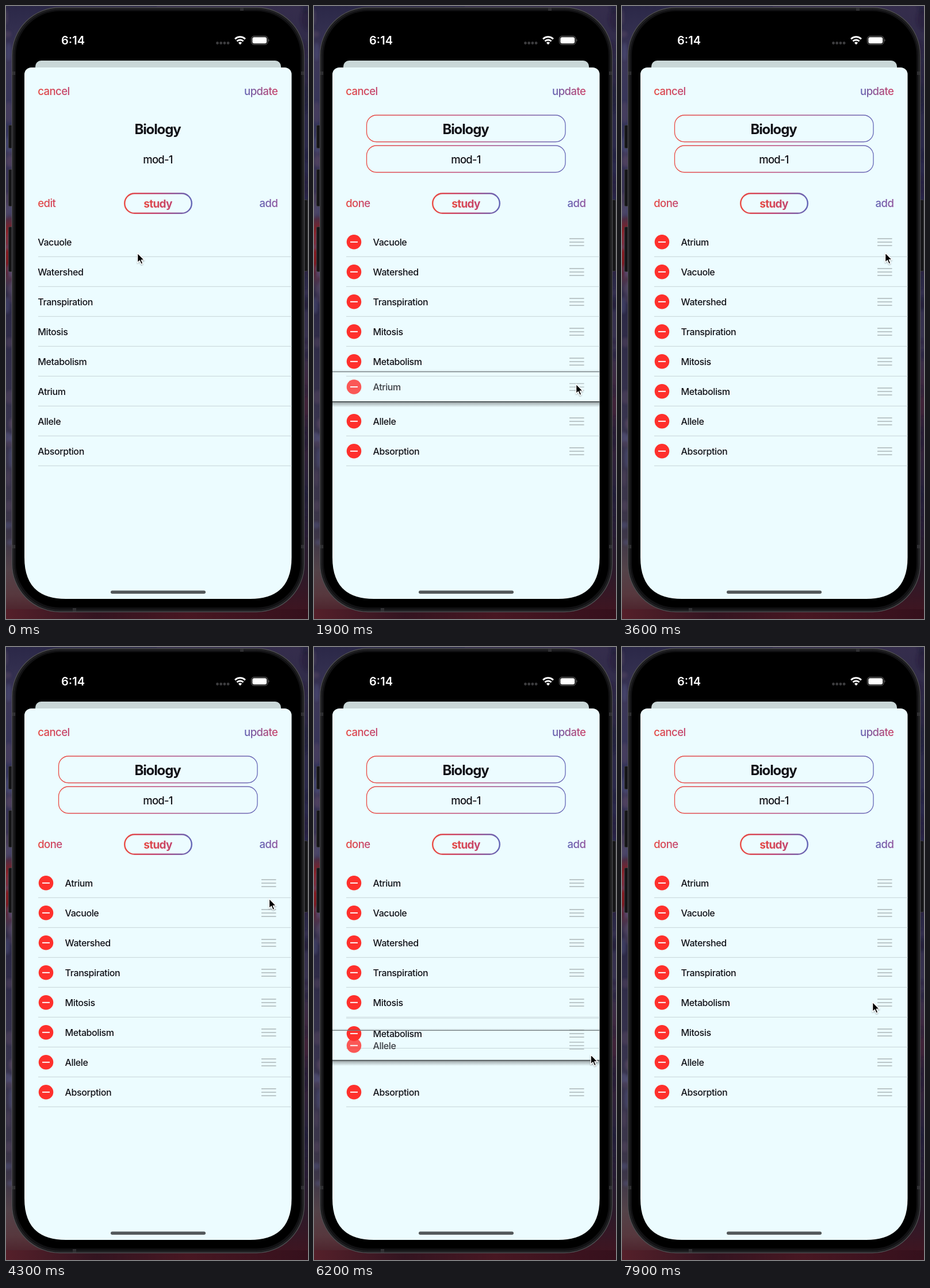
Write an HTML page that moves like this. It is 525 px wide and 1067 px high and loops after 8 s.

```html
<!DOCTYPE html>
<html lang="en">
<head>
<meta charset="utf-8">
<title>Study set editor</title>
<style>
html, body { margin: 0; width: 100%; height: 100%; overflow: hidden; background: #000; }
svg { display: block; width: 525px; height: 1067px; }
text { font-family: Inter, "Open Sans", sans-serif; font-weight: 500; fill: #111117; }
.link { font-size: 18.5px; letter-spacing: -.53px; }
.row text { font-size: 16px; font-weight: 550; letter-spacing: -.4px; }
.sep { stroke: #c6d4d7; stroke-width: 1; }
.grip { stroke: #abb5b8; stroke-width: 1.6; fill: none; }
</style>
</head>
<body>
<svg viewBox="0 0 525 1067" xmlns="http://www.w3.org/2000/svg">
  <defs>
    <linearGradient id="wallL" x2="0" y2="1">
      <stop offset="0" stop-color="#2b2848"/><stop offset=".09" stop-color="#3d3858"/>
      <stop offset=".2" stop-color="#34345a"/><stop offset=".34" stop-color="#3b3350"/>
      <stop offset=".37" stop-color="#8f1d20"/><stop offset=".42" stop-color="#7a1a22"/>
      <stop offset=".46" stop-color="#2a2744"/><stop offset=".7" stop-color="#39354f"/>
      <stop offset=".86" stop-color="#3c3648"/><stop offset=".92" stop-color="#544349"/>
      <stop offset=".96" stop-color="#57383e"/><stop offset="1" stop-color="#481a24"/>
    </linearGradient>
    <linearGradient id="wallR" x2="0" y2="1">
      <stop offset="0" stop-color="#352d4c"/><stop offset=".1" stop-color="#2e2b48"/>
      <stop offset=".3" stop-color="#28264a"/><stop offset=".55" stop-color="#38324f"/>
      <stop offset=".65" stop-color="#402238"/><stop offset=".8" stop-color="#24203a"/>
      <stop offset=".92" stop-color="#2b1a2a"/><stop offset="1" stop-color="#42141f"/>
    </linearGradient>
    <linearGradient id="floor">
      <stop offset="0" stop-color="#55202a"/><stop offset=".3" stop-color="#331420"/>
      <stop offset=".6" stop-color="#481722"/><stop offset="1" stop-color="#35101c"/>
    </linearGradient>
    <linearGradient id="brand">
      <stop offset="0" stop-color="#ea4a42"/><stop offset=".5" stop-color="#bd4878"/>
      <stop offset="1" stop-color="#6467b7"/>
    </linearGradient>
    <linearGradient id="warm">
      <stop offset="0" stop-color="#e64943"/><stop offset="1" stop-color="#c1456f"/>
    </linearGradient>
    <linearGradient id="rose">
      <stop offset="0" stop-color="#e64943"/><stop offset="1" stop-color="#d1465f"/>
    </linearGradient>
    <linearGradient id="cool">
      <stop offset="0" stop-color="#6365b5"/><stop offset="1" stop-color="#cb446a"/>
    </linearGradient>
    <linearGradient id="violet">
      <stop offset="0" stop-color="#6365b5"/><stop offset="1" stop-color="#91549c"/>
    </linearGradient>
    <linearGradient id="under" x2="0" y2="1">
      <stop offset="0" stop-color="#222" stop-opacity=".4"/><stop offset="1" stop-color="#222" stop-opacity="0"/>
    </linearGradient>
    <linearGradient id="over" x2="0" y2="1">
      <stop offset="0" stop-color="#222" stop-opacity="0"/><stop offset="1" stop-color="#222" stop-opacity=".16"/>
    </linearGradient>
    <filter id="drop" x="-50%" y="-30%" width="200%" height="180%">
      <feDropShadow dx="0" dy="1.2" stdDeviation="1" flood-opacity=".35"/>
    </filter>
    <filter id="soft"><feGaussianBlur stdDeviation="2"/></filter>
  </defs>

  <rect width="262" height="1067" fill="url(#wallL)"/>
  <rect x="262" width="263" height="1067" fill="url(#wallR)"/>
  <rect y="1050" width="525" height="17" fill="url(#floor)"/>
  <g id="paint" filter="url(#soft)"></g>

  <g fill="#151517" stroke="#3b3b3e">
    <rect x="4.5" y="207.5" width="9" height="40" rx="2"/>
    <rect x="4.5" y="284.5" width="9" height="64" rx="2"/>
    <rect x="4.5" y="384.5" width="9" height="78" rx="2"/>
    <rect x="515.5" y="337.5" width="9" height="124" rx="2"/>
  </g>
  <rect x="10.5" y="2.5" width="508" height="1052" rx="83" fill="#1b1b1d" stroke="#4e4e51" stroke-width="1.3"/>
  <rect x="13.5" y="5.5" width="502" height="1046" rx="80" fill="#111113" stroke="#29292c"/>
  <rect x="17" y="9" width="495" height="1038" rx="77"/>
  <path d="M11 117h5M513 117h5M11 941h5M513 941h5M119 1048v6M410 3v5" stroke="#303033" stroke-width="6"/>

  <text x="96" y="67" font-size="20" style="font-weight:600;fill:#fff">6:14</text>
  <g fill="#3d3d3f">
    <circle cx="367.5" cy="64.5" r="2.4"/><circle cx="373.7" cy="64.5" r="2.4"/>
    <circle cx="379.9" cy="64.5" r="2.4"/><circle cx="386.1" cy="64.5" r="2.4"/>
  </g>
  <g fill="none" stroke="#fff" stroke-width="2.8">
    <path d="M398.1 57.5a12.4 12.4 0 0 1 17.8 0M401.4 61.3a8 8 0 0 1 11.2 0"/>
    <path d="M403.9 63.9a4.4 4.4 0 0 1 6.2 0L407 67.2Z" fill="#fff" stroke="none"/>
  </g>
  <rect x="426.5" y="52.5" width="28.5" height="14.5" rx="4.5" fill="none" stroke="#777"/>
  <rect x="428.3" y="54.3" width="24.9" height="10.9" rx="3" fill="#fff"/>
  <path d="M456.5 57.5q2 2.2 0 4.5z" fill="#777"/>

  <path d="M51 125V105a10 10 0 0 1 10-10H468a10 10 0 0 1 10 10V125Z" fill="#c9d7d7"/>
  <path d="M32 119a12 12 0 0 1 12-12H484.5a12 12 0 0 1 12 12V960c0 48-24 72-72 72H104c-48 0-72-24-72-72Z" fill="#ecfcff"/>

  <text class="link" x="55.2" y="155" style="fill:url(#warm)">cancel</text>
  <text class="link" x="472.4" y="155" text-anchor="end" style="fill:url(#cool)">update</text>
  <g id="fields" fill="none" stroke="url(#brand)" stroke-width="1.3">
    <rect x="91.5" y="190" width="345.5" height="46.5" rx="17"/>
    <rect x="91.5" y="243" width="345.5" height="46.5" rx="17"/>
  </g>
  <text x="263.5" y="222.5" text-anchor="middle" font-size="24" letter-spacing="-1.1" style="font-weight:700">Biology</text>
  <text x="264" y="274" text-anchor="middle" font-size="18.5" letter-spacing="-.75">mod-1</text>
  <text class="link" id="edit" x="55.2" y="350" style="fill:url(#rose)">edit</text>
  <text class="link" id="done" x="55.2" y="350" style="fill:url(#warm)">done</text>
  <rect x="206.2" y="326.2" width="116.6" height="34.6" rx="17.3" fill="none" stroke="url(#brand)" stroke-width="2.4"/>
  <text x="264" y="351" text-anchor="middle" font-size="19" letter-spacing="-.7" style="font-weight:700;fill:url(#warm)">study</text>
  <text class="link" x="472.4" y="350" text-anchor="end" style="fill:url(#violet)">add</text>

  <g id="list"></g>
  <rect x="182" y="1017.5" width="165" height="5.5" rx="2.75" fill="#53585a"/>
  <g id="cursor">
    <path transform="translate(.6 1)" d="M0 0V16.8L3.8 13.2L6.5 19.4L9.3 18.2L6.7 12.2H12Z" stroke="#fff" stroke-width="1.3" stroke-linejoin="round" filter="url(#drop)"/>
  </g>
</svg>
<script>
const LOOP = 8000, STEP = 100, TOP = 410.8, PITCH = 52;
const $ = id => document.getElementById(id);
const NS = "http://www.w3.org/2000/svg";
const clamp = v => Math.max(0, Math.min(1, v));
const ease = v => { v = clamp(v); return v * v * (3 - 2 * v); };

// Interpolates [time, value...] keys with easing between neighbours.
function track(keys, t) {
  const i = keys.findIndex(k => k[0] > t);
  if (i < 0) return keys[keys.length - 1].slice(1);
  if (i === 0) return keys[0].slice(1);
  const a = keys[i - 1], b = keys[i], p = ease((t - a[0]) / (b[0] - a[0]));
  return a.slice(1).map((v, n) => v + (b[n + 1] - v) * p);
}

// Moves hold [start, target slot]; drags carry a row freely for a while.
const SLIDE = 350;
const rows = [
  { name: "Vacuole", slot: 0, moves: [[2520, 1]] },
  { name: "Watershed", slot: 1, moves: [[2433, 2]] },
  { name: "Transpiration", slot: 2, moves: [[2285, 3]] },
  { name: "Mitosis", slot: 3, moves: [[2210, 4], [7140, 5]] },
  { name: "Metabolism", slot: 4, moves: [[2110, 5], [5540, 6], [5892, 5], [7140, 4]],
    drag: [[6850, 671], [7350, 617], [7500, 619]] },
  { name: "Atrium", slot: 5, moves: [[2100, 0]],
    drag: [[1750, 671], [2050, 655], [2500, 459.5], [2750, 408], [2950, 408], [3150, 411]] },
  { name: "Allele", slot: 6, moves: [],
    drag: [[5450, 723], [5700, 650], [5900, 650], [6200, 693.7], [6400, 725], [6550, 723]] },
  { name: "Absorption", slot: 7, moves: [] }
];

const cursorKeys = [
  [0, 228, 429], [500, 76, 347], [750, 78, 350], [1000, 90, 369], [1600, 455, 665],
  [1750, 455, 665], [2050, 455, 649], [2500, 454.5, 453], [2750, 457, 403], [3150, 457, 406],
  [3600, 457, 428.5], [4200, 457, 428.5], [4800, 455, 545], [5100, 454.5, 536.5], [5400, 478, 738],
  [5450, 478, 738], [5700, 481, 665], [5900, 481, 665], [6200, 480.5, 708.5], [6400, 480, 740],
  [6550, 476, 738], [6850, 448, 672], [7350, 445, 618], [7900, 435, 617]
];

rows.forEach(r => {
  const g = document.createElementNS(NS, "g");
  g.setAttribute("class", "row");
  g.innerHTML = `
    <g class="lift">
      <rect x="32" y="-30" width="464.5" height="4" fill="url(#over)"/>
      <rect x="32" y="-27" width="464.5" height="1.3" fill="#747e80"/>
      <rect x="32" y="25" width="464.5" height="1.8" fill="#4d5355"/>
      <rect x="32" y="26.5" width="464.5" height="9" fill="url(#under)"/>
    </g>
    <line class="sep top" x1="56" x2="496.5" y1="-26.5" y2="-26.5"/>
    <line class="sep bottom" x1="56" x2="496.5" y1="25.5" y2="25.5"/>
    <g class="body">
      <g class="minus"><circle cx="69.5" r="12.8" fill="#fe302c"/>
        <path d="M63 0h13" stroke="#fff" stroke-width="1.9"/></g>
      <text y="6.2">${r.name}</text>
      <path class="grip" d="M444 -5.8h25.500M444 .2h25.500M444 6.2h25.500"/>
    </g>`;
  $("list").append(g);
  r.g = g;
  for (const k of ["lift", "top", "bottom", "body", "minus", "grip"]) r[k] = g.querySelector("." + k);
  r.text = g.querySelector("text");
});

// Loose brush strokes along the visible edges of the wallpaper.
let seed = 11;
const rnd = () => (seed = seed * 16807 % 2147483647) / 2147483647;
const hues = ["#555a86", "#231f3a", "#5c4a63", "#1d1b34"];
let strokes = "";
for (let i = 0; i < 70; i++) {
  const x = i % 2 ? 516 + rnd() * 9 : rnd() * 12, y = rnd() * 940;
  strokes += `<ellipse cx="${x}" cy="${y}" rx="${3 + rnd() * 7}" ry="${4 + rnd() * 16}" fill="${hues[i % 4]}" opacity=".4"/>`;
}
$("paint").innerHTML = strokes;

function place(r, t) {
  let slot = r.slot;
  for (const [start, to] of r.moves) slot += (to - slot) * ease((t - start) / SLIDE);
  if (r.drag) {
    const from = r.drag[0][0], end = r.drag[r.drag.length - 1][0];
    if (t >= from && t < end) {
      const lift = Math.min(clamp((t - from + 50) / 200), clamp((end - t) / 200));
      return { y: track(r.drag, t)[0], lift, edge: 0 };
    }
  }
  // A row just off its slot shows its own upper edge.
  const off = Math.abs(slot - Math.round(slot)) * PITCH;
  return { y: TOP + slot * PITCH, lift: 0, edge: off > .5 ? clamp(1 - off / 12) : 0 };
}

function draw(t) {
  const edit = ease((t - 620) / 330);
  const scroll = -7.5 * Math.min(ease((t - 4750) / 300), 1 - ease((t - 5100) / 300));
  const moving = [];
  rows.forEach(r => {
    const { y, lift, edge } = place(r, t);
    r.g.setAttribute("transform", `translate(0 ${(y + scroll).toFixed(2)})`);
    r.lift.setAttribute("opacity", lift);
    r.top.setAttribute("opacity", edge);
    r.bottom.setAttribute("opacity", 1 - lift);
    r.body.setAttribute("opacity", 1 - .2 * lift);
    r.text.setAttribute("x", 55.3 + 47.3 * edit);
    r.minus.setAttribute("opacity", edit);
    r.minus.setAttribute("transform", `translate(${-40 * (1 - edit)} 0)`);
    r.grip.setAttribute("opacity", edit);
    r.grip.setAttribute("transform", `translate(${30 * (1 - edit)} 0)`);
    if (lift) moving.push(r.g);
  });
  moving.forEach(g => { if (g !== $("list").lastChild) $("list").append(g); });
  $("fields").setAttribute("opacity", edit);
  $("edit").setAttribute("opacity", t < 600 ? 1 : clamp(1 - (t - 600) / 200) * .6);
  $("done").setAttribute("opacity", t <= 1000 ? .4 * clamp((t - 700) / 300) : .4 + .6 * clamp((t - 1000) / 200));
  const [x, y] = track(cursorKeys, t);
  $("cursor").setAttribute("transform", `translate(${x.toFixed(1)} ${y.toFixed(1)})`);
}

const begin = performance.now();
function tick() {
  const t = (performance.now() - begin) % LOOP;
  draw(Math.floor(t / STEP) * STEP);
  requestAnimationFrame(tick);
}
draw(0);
requestAnimationFrame(tick);
</script>
</body>
</html>
```
